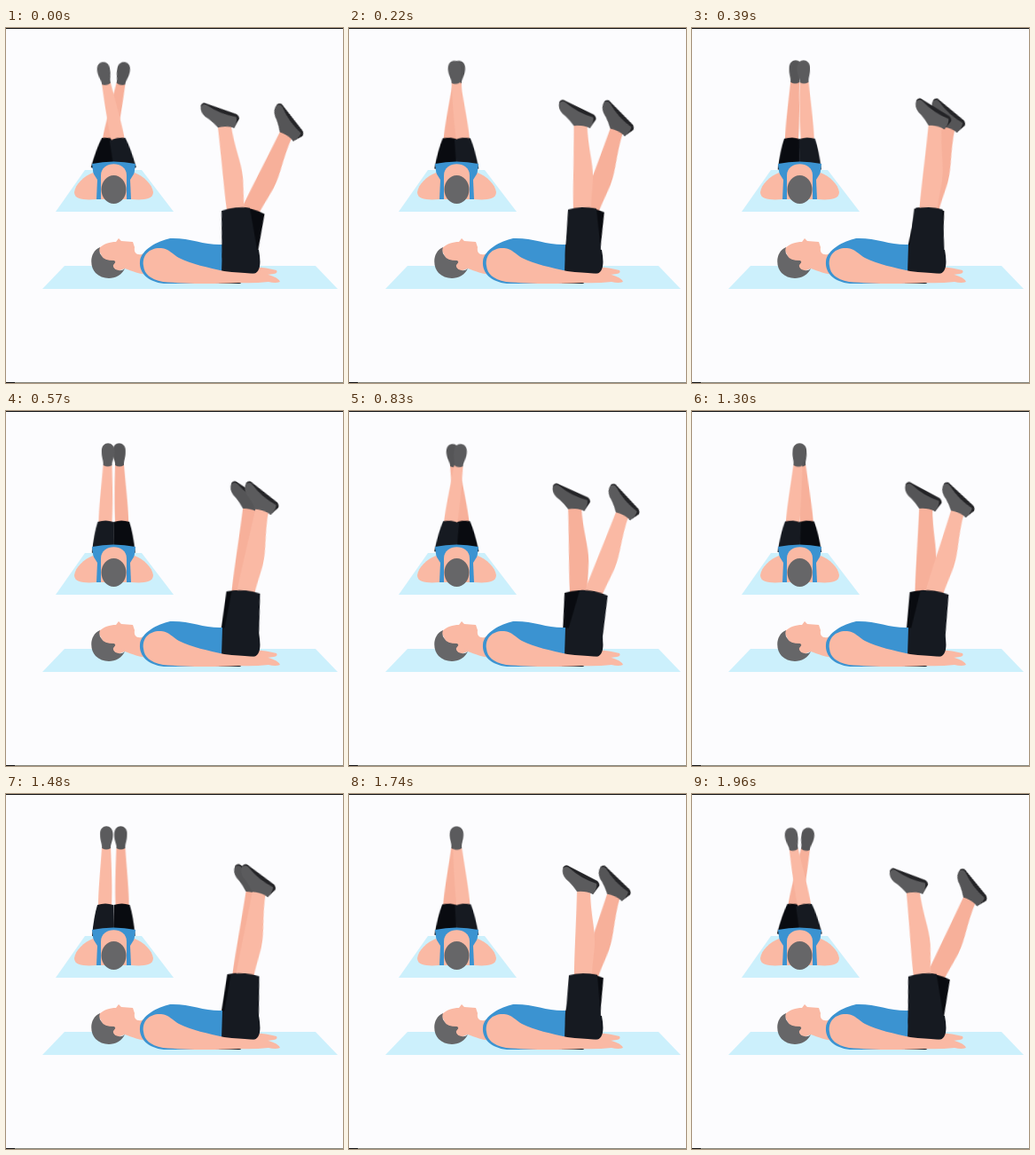
Animation of 380 by 400 pixels, one loop 2.01 s. Source, as an HTML page:

```html
<!DOCTYPE html>
<html lang="en">
<head>
<meta charset="utf-8">
<title>Scissor kicks</title>
<style>
  html, body { margin: 0; width: 100%; height: 100%; overflow: hidden; background: #fcfcfe; }
  svg { display: block; width: 380px; height: 400px; }

  svg { --skin: #fab9a4; --cloth: #161a21; --shoe: #5b5b5d; --sole: #242427; }
  .shade { --skin: #f7b09a; --cloth: #090b10; --shoe: #555557; }
  .skin { fill: var(--skin); }
  .cloth { fill: var(--cloth); }
  .shoe { fill: var(--shoe); }
  .sole { fill: var(--sole); }
  .shirt { fill: #3b93d1; }
  .hair { fill: #666668; }
  .mat { fill: #ccf0fc; }

  /* Side view: each leg sweeps one way, then back */
  .leg, .shin { animation: swing 1005ms cubic-bezier(.35, .28, .65, .72) infinite alternate; }
  .leg { transform-origin: 265px 262px; }
  .shin { transform-origin: 265px 203px; animation-name: bend; }
  .far, .far .shin { animation-delay: -1005ms; }
  @keyframes swing { from { transform: rotate(-6deg); } to { transform: rotate(14deg); } }
  @keyframes bend { from { transform: rotate(-2deg); } to { transform: rotate(10.7deg); } }

  /* Head-on view: legs cross twice per loop, the front one alternates */
  .cross { transform-origin: 112px 152px; animation: cross 502.5ms linear infinite alternate; }
  @keyframes cross { from { transform: rotate(10.5deg); } to { transform: rotate(-.5deg); } }
  .rightFront { animation: order 2010ms step-end infinite; }
  .leftFront { animation: order 2010ms step-end -1005ms infinite; }
  @keyframes order {
    0%, 75% { visibility: visible; }
    25% { visibility: hidden; }
  }
</style>
</head>
<body>
<svg viewBox="0 0 380 400">
  <defs>
    <path id="thigh" class="cloth" d="M249 204Q265 200 281 204L285 262Q286 276 276 277L246 273L244 256Z"/>
    <g id="calf">
      <path class="skin" d="M255 206C255 180 257 150 258 108L273 108C273 135 279 152 278 170C277 184 275 194 275 206Z"/>
      <path class="sole" d="M242 83Q245 78 250 82L281 98Q285 102 282 105L276 113L244 88Z"/>
      <path class="shoe" d="M242 84Q246 80 250 84Q262 95 280 101Q281 106 276 113Q268 109 258 110Q254 104 249 99Q240 92 242 84Z"/>
    </g>
    <g id="frontLeg">
      <path class="skin" d="M104 127C104 108 106 90 108 60L118 60C119 85 120 108 119 127Z"/>
      <path class="shoe" d="M106 46C105 33 121 33 120.500 46C120.500 53 117.500 57 118 61Q113 64 108 61C108.500 56 106 53 106 46Z"/>
      <path class="cloth" d="M103 125Q112 122 121 125L122 162L97 160Q99 138 103 125Z"/>
    </g>
  </defs>

  <rect width="380" height="400" fill="#fcfcfe"/>

  <!-- Head-on view -->
  <path class="mat" d="M56 207L89 160H153L189 207Z"/>
  <g class="rightFront">
    <g class="shade"><use href="#frontLeg" class="cross"/></g>
    <g transform="matrix(-1 0 0 1 242.600 0)"><use href="#frontLeg" class="cross"/></g>
  </g>
  <g class="leftFront">
    <g class="shade" transform="matrix(-1 0 0 1 242.600 0)"><use href="#frontLeg" class="cross"/></g>
    <use href="#frontLeg" class="cross"/>
  </g>
  <path class="shirt" d="M97 153Q121 148 146 153L144 168L141 193H102L99 168Z"/>
  <path id="arm" class="skin" d="M98 163C88 167 78 176 77 185C77 194 91 194 102 193L103 171Z"/>
  <use href="#arm" transform="matrix(-1 0 0 1 243 0)"/>
  <path class="skin" d="M107 193V166C107 149 136 149 136 166V193Z"/>
  <ellipse class="hair" cx="121.500" cy="182" rx="14" ry="16"/>

  <!-- Side view -->
  <path class="mat" d="M41 294L66 268H349L374 294Z"/>
  <path class="skin" d="M280 269Q294 270 305 273Q307 276 302 277L280 280Z"/>
  <g class="shade" transform="translate(-3 0)">
    <g class="leg far">
      <g class="shin"><use href="#calf"/></g>
      <use href="#thigh"/>
    </g>
  </g>
  <path class="cloth" d="M243 244L285 250Q290 276 278 277L264 288H236Z"/>
  <path class="skin" d="M104 249C110 243 117 241 124 241L127 237L130 240L143 241L145 247C144 253 147 256 153 255L174 245L164 279C150 277 142 274 134 271L118 277Z"/>
  <path class="hair" d="M106 247C94 252 94 269 101 276C110 285 128 284 134 271Q131 274 127 273Q120 271 121 267Q125 264 122 262Q110 262 108 257Q104 253 106 247Z"/>
  <circle class="skin" cx="126" cy="268" r="4.500"/>
  <path class="shirt" d="M151 263C152 250 171 240 185 237C207 236 224 245 244 244L243 276L240 288H178C160 286 150 276 151 263Z"/>
  <g class="leg">
    <g class="shin"><use href="#calf"/></g>
    <use href="#thigh"/>
  </g>
  <path class="skin" d="M155 268C153 255 163 247 175 248C184 249 188 255 195 259C209 266 228 270 246 274C270 277 284 276 296 278Q307 281 309 286Q304 288 296 286Q278 288 262 287C230 289 200 288 177 286C162 283 156 277 155 268Z"/>

  <path d="M0 .5H380M0 399.500H10" stroke="#111"/>
  <path d="M10 399.500H380" stroke="#85857c"/>
</svg>
</body>
</html>
```
